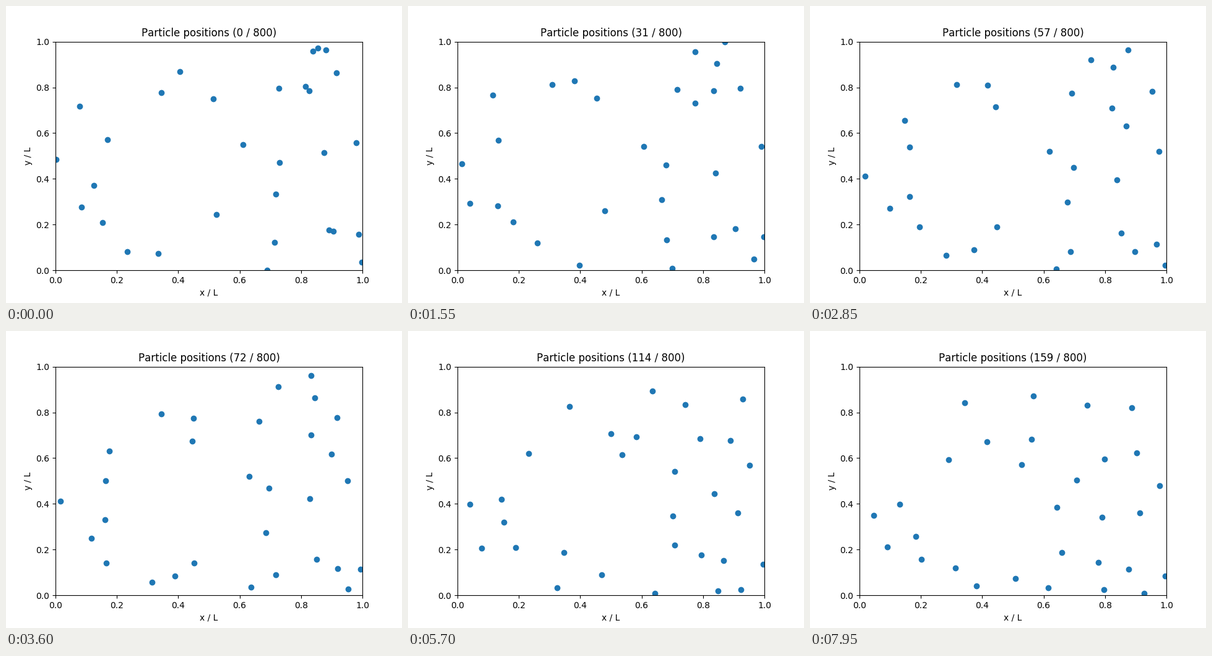
A matplotlib script that plays this animation: 640x480 px, repeating every 8 s.

```python
import numpy as np
import matplotlib.pyplot as plt
from matplotlib.animation import FuncAnimation

FRAMES, STEP_MS, TOTAL = 160, 50, 800
LOW, HIGH = np.array([80, 57.6]), np.array([576, 427.2])   # box corners, pixels
GAP, SPREAD = 37, 6      # spacing kept by repulsion, and steps it takes to build up
WOBBLE = 24              # pixel size of the slowest wobble

START = np.array([
    (81, 248), (119, 162), (164, 216), (142, 290), (122, 325), (156, 350),
    (196, 397), (246, 400), (251, 140), (281, 106), (335, 150), (383, 224),
    (340, 337), (434, 382), (422, 427), (436, 304), (442, 253), (441, 133),
    (484, 130), (490, 137), (496, 73), (504, 68), (517, 71), (534, 108),
    (514, 237), (566, 221), (522, 362), (529, 364), (570, 369), (575, 414)], float)
END = np.array([
    (103, 298), (224, 208), (145, 280), (171, 332), (125, 349), (180, 369),
    (269, 412), (332, 400), (250, 116), (342, 216), (286, 179), (431, 241),
    (235, 383), (475, 418), (385, 415), (407, 358), (399, 285), (358, 175),
    (476, 207), (565, 250), (361, 105), (520, 124), (448, 120), (528, 197),
    (472, 301), (533, 294), (466, 374), (515, 385), (574, 396), (540, 424)], float)

rng = np.random.default_rng(7)
waves = np.arange(2, 6)
sway = rng.normal(size=(len(waves),) + START.shape) * (WOBBLE / waves)[:, None, None]


def bounce(p):
    """Fold positions back at the walls."""
    size = HIGH - LOW
    return LOW + size - np.abs(size - np.abs(p - LOW))


def repel(p, gap):
    """Push apart every pair closer than the gap."""
    for _ in range(30):
        away = p[:, None] - p[None]
        dist = np.hypot(away[..., 0], away[..., 1])
        np.fill_diagonal(dist, np.inf)
        push = np.maximum(gap - dist, 0) / 2 / np.maximum(dist, 1)
        p = np.clip(p + (away * push[..., None]).sum(axis=1), LOW, HIGH)
    return p


def positions(step):
    u = step / (FRAMES - 1)
    drift = START + (END - START) * u
    wobble = np.tensordot(np.sin(np.pi * waves * u), sway, axes=1)
    return repel(bounce(drift + wobble), GAP * (1 - np.exp(-step / SPREAD)))


plt.rcParams["text.kerning_factor"] = 6
fig, ax = plt.subplots(figsize=(6.4, 4.8), dpi=100)
ax.set_xlim(0, 1)
ax.set_ylim(0, 1)
ax.set_xlabel("x / L")
ax.set_ylabel("y / L")
title = ax.set_title("")
dots, = ax.plot([], [], "o", color="#1f77b4")


def draw(step):
    x, y = ((positions(step) - LOW) / (HIGH - LOW)).T
    dots.set_data(x, 1 - y)
    title.set_text(f"Particle positions ({step} / {TOTAL})")
    return dots, title


anim = FuncAnimation(fig, draw, frames=FRAMES, interval=STEP_MS,
                     repeat=True, repeat_delay=0, blit=False)
plt.show()
```
